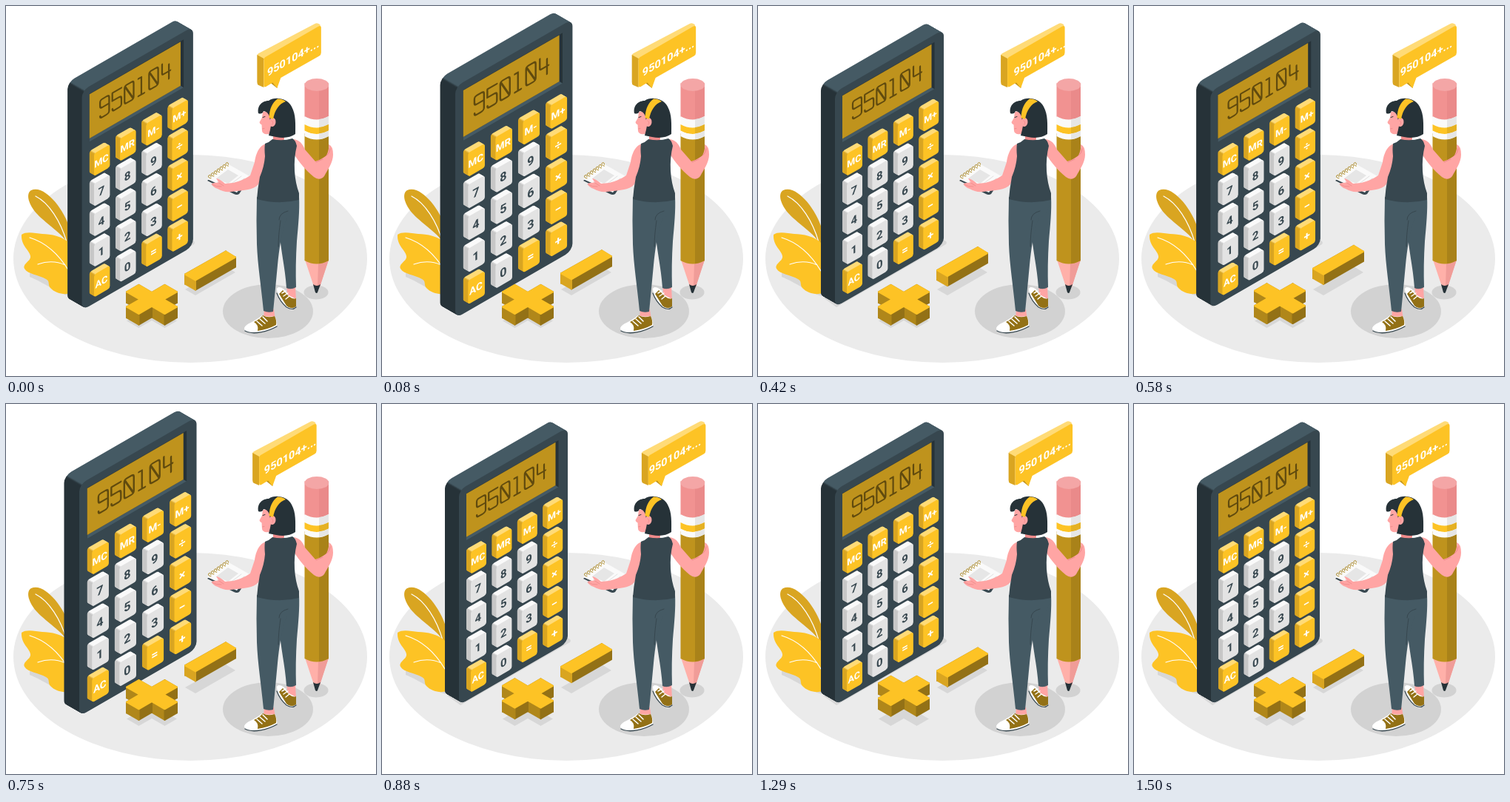
An HTML page with a canvas for the animation above (1540 ms loop, 500 by 500 pixels).

```html
<!DOCTYPE html>
<html lang="en">
<head>
<meta charset="utf-8">
<title>Calculator</title>
<style>
html, body { margin: 0; width: 100%; height: 100%; overflow: hidden; background: #fff; }
canvas { display: block; width: 100vw; height: 100vh; }
</style>
</head>
<body>
<canvas id="stage"></canvas>
<script>
const SIZE = 500, LOOP = 1540, STEPS = 37, CYCLE = 1500, LEAD = 33, ISO = 0.577;
const GOLD = '#fdc325', DARK = '#263238', SLATE = '#37474f', STEEL = '#455a64';
const OCHRE = '#bf931d', OLIVE = '#937116', SKIN = '#ffa5a4', BLUSH = '#ee8a8a', SHADE = '#d7d7d7';

const canvas = document.getElementById('stage');
const ctx = canvas.getContext('2d');
const density = Math.max(1, window.devicePixelRatio || 1);
canvas.width = canvas.height = SIZE * density;

// Motion curves: pairs of [cycle fraction, value], linear in between.
const BEAT = [[0, 1], [.1, 1.1], [.3, 1], [.4, 1], [.5, 1.1], [.6, 1], [1, 1]];
const SHAKE = [[0, 0], [.1, -1], [.2, 2], [.3, -4], [.4, 4], [.5, -4], [.6, 4], [.7, -4], [.8, 2], [.9, -1], [1, 0]];
const FLOAT = [[0, 0], [.5, -10], [1, 0]];

function curve(keys, p) {
  const i = Math.max(1, keys.findIndex(k => k[0] >= p));
  const [a, b] = [keys[i - 1], keys[i]];
  return a[1] + (b[1] - a[1]) * (p - a[0]) / (b[0] - a[0]);
}

function fill(d, color) {
  ctx.fillStyle = color;
  ctx.fill(new Path2D(d));
}

function line(d, color, width) {
  ctx.strokeStyle = color;
  ctx.lineWidth = width;
  ctx.lineCap = ctx.lineJoin = 'round';
  ctx.stroke(new Path2D(d));
}

function oval(x, y, rx, ry, color, turn = 0) {
  ctx.fillStyle = color;
  ctx.beginPath();
  ctx.ellipse(x, y, rx, ry, turn, 0, Math.PI * 2);
  ctx.fill();
}

function at(x, y, draw) {
  ctx.save();
  ctx.translate(x, y);
  draw();
  ctx.restore();
}

// Upright plane running up to the right.
function onPlane(x, y, draw) {
  ctx.save();
  ctx.transform(1, -ISO, 0, 1, x, y);
  draw();
  ctx.restore();
}

function roundBox(x, y, w, h, r) {
  ctx.beginPath();
  ctx.roundRect(x, y, w, h, r);
  ctx.fill();
}

// Rounded plate on the plane with thickness going back to the upper left.
function slab(u, v, w, h, r, depth, side, top, front) {
  for (let d = depth; d > 0; d -= .5) {
    const x = u - d, g = ctx.createLinearGradient(x + r * .3, 0, x + r * .3 + 1.5, 0);
    g.addColorStop(0, side);
    g.addColorStop(1, top);
    ctx.fillStyle = g;
    roundBox(x, v - 2 * ISO * d, w, h, r);
  }
  ctx.fillStyle = front;
  roundBox(u, v, w, h, r);
}

const outline = points => 'M' + points.map(p => p.join(' ')).join('L') + 'Z';

// Lying block: vertical walls below a flat top outline.
function prism(points, height, leftColor, rightColor) {
  const paint = (ps, color) => { fill(outline(ps), color); line(outline(ps), color, 2); };
  points.map((a, i) => [a, points[(i + 1) % points.length]])
    .sort((e, f) => e[0][1] + e[1][1] - f[0][1] - f[1][1])
    .forEach(([a, b]) => {
      const falling = (b[1] - a[1]) * (b[0] - a[0]) > 0;
      paint([a, b, [b[0], b[1] + height], [a[0], a[1] + height]], falling ? leftColor : rightColor);
    });
  paint(points, GOLD);
}

const MINUS = [[242, 363], [297, 332], [310, 340], [256, 371]];
const ARM = 30.3, HALF = 9.7;
const PLUS = [[-ARM, -HALF], [-ARM, HALF], [-HALF, HALF], [-HALF, ARM], [HALF, ARM], [HALF, HALF],
  [ARM, HALF], [ARM, -HALF], [HALF, -HALF], [HALF, -ARM], [-HALF, -ARM], [-HALF, -HALF]]
  .map(([q, p]) => [197 + .85 * (p + q), 396.5 + .49 * (q - p)]);

function ground() {
  oval(249, 341.5, 239, 140.5, '#ebebeb');
  oval(354, 412.5, 61, 36.5, '#d2d2d2');
  oval(419, 387, 16.5, 9.5, '#d2d2d2');
  fill('M32 361C42 355 62 362 86 372V392C70 388 48 372 32 366Z', SHADE);
  fill('M88 394L106 407L254 322Q257 318 250 316Z', SHADE);
  at(0, 20, () => fill(outline(MINUS), SHADE));
  at(0, 19, () => fill(outline(PLUS), SHADE));
}

function leaves() {
  fill('M86 325C76 306 57 297 42 281C31 269 26 254 34 249C52 241 78 274 86 300Z', '#d9a521');
  line('M40 257C58 266 74 291 82 319', '#fff', 1.2);
  fill('M21 309C27 304 40 307 49 308C60 308 78 311 87 322V388C79 391 66 388 60 381C56 377 60 372 54 369C44 363 30 363 25 355C22 348 34 345 33 338C32 330 20 324 21 309Z', GOLD);
  line('M32 313C52 319 71 335 85 358M43 349C57 344 69 345 80 350', '#fff', 1.2);
}

const DIGITS = {
  9: 'M12 11H3Q0 11 0 8V3Q0 0 3 0H9Q12 0 12 3V21Q12 24 8 24H3Q0 24 0 21',
  5: 'M12 0H0V10.500H9Q12 10.500 12 14V21Q12 24 9 24H3Q0 24 0 21',
  0: 'M3 0H9Q12 0 12 3V21Q12 24 9 24H3Q0 24 0 21V3Q0 0 3 0ZM1 2L11 22',
  1: 'M2 1H6V24M2 24H10',
  4: 'M1 0V12Q1 14 3 14H12M10 5V24'
};

const KEYS = [
  ['MC', 'MR', 'M-', 'M+'],
  ['7', '8', '9', '÷'],
  ['4', '5', '6', '×'],
  ['1', '2', '3', '−'],
  ['AC', '0', '=', '+']
];

function screen() {
  ctx.fillStyle = DARK;
  ctx.fillRect(10, 7.5, 124.5, 63.5);
  fill('M10 66.4H130.500L134.500 71H10Z', STEEL);
  ctx.fillStyle = OCHRE;
  ctx.fillRect(10, 8, 120.5, 58.4);
  [...'950104'].forEach((c, i) => at(24 + i * 16.2, 24, () => line(DIGITS[c], '#604a0e', 2.2)));
}

function key(label, row, col) {
  const u = 16 + col * 34.4, v = 90 + row * 40;
  const pale = /\d/.test(label);
  if (pale) slab(u, v, 21, 30, 3, 6, '#c7c7c7', '#fafafa', '#e3e3e3');
  else slab(u, v, 21, 30, 3, 6, '#d9a521', '#ffdb77', GOLD);
  ctx.fillStyle = pale ? SLATE : '#fff';
  ctx.font = `700 ${label.length > 1 ? 12.5 : 15}px Roboto, "Open Sans", sans-serif`;
  ctx.textAlign = 'center';
  ctx.textBaseline = 'middle';
  ctx.fillText(label, u + 9.8, v + 15.8);
}

function calculator(scale) {
  ctx.save();
  ctx.translate(168, 213.5);
  ctx.scale(scale, scale);
  ctx.translate(-168, -213.5);
  onPlane(104, 119, () => {
    slab(0, -2.5, 147, 290.5, 9, 19, DARK, STEEL, SLATE);
    screen();
    KEYS.forEach((row, r) => row.forEach((label, c) => key(label, r, c)));
  });
  ctx.restore();
}

function bubble(shake) {
  at(shake * 3, 0, () => {
    fill('M357 103L367 111L370 95Z', OCHRE);
    fill('M340 67Q340 65 342 64L418 24Q421 22 425 25L426 30L349 73Z', '#ffdb77');
    fill('M340 66L349 71V110L342 107Q340 106 340 103Z', '#d9a521');
    fill('M349 73Q349 70 352 68.500L423 27.500Q426.500 26 426.500 29V63Q426.500 66 424 67.500L372 97L367 111L361 103.500L352 109Q349 110.500 349 107Z', GOLD);
  });
  onPlane(353.4 + shake * 2, 95.4, () => {
    ctx.fillStyle = '#fff';
    ctx.font = '700 14.5px Roboto, "Open Sans", sans-serif';
    ctx.textAlign = 'left';
    ctx.textBaseline = 'alphabetic';
    ctx.fillText('950104+...', 0, 0);
  });
}

function band(top, bottom, color, shadeColor) {
  fill(`M403.5 ${top}Q420 ${top + 9} 436 ${top}V${bottom}Q420 ${bottom + 9} 403.5 ${bottom}Z`, color);
  fill(`M423 ${top + 4}Q430 ${top + 3} 436 ${top}V${bottom}Q430 ${bottom + 3} 423 ${bottom + 4}Z`, shadeColor);
}

function pencil() {
  fill('M404 343L416 379H424L436 343Z', '#ffb0a9');
  fill('M422 347L421 380H424L436 343Z', '#f09c98');
  fill('M415 376Q420 380 425 376L421 387Q420 389 418 387Z', DARK);
  band(172, 344, OCHRE, '#a98219');
  band(104, 150, '#f19291', '#ea8a8a');
  band(149, 160, '#fafafa', '#e6e6e6');
  band(160, 168.5, GOLD, '#e5b123');
  band(168.5, 176, '#fafafa', '#e6e6e6');
  oval(420, 106.5, 16.3, 8.5, '#f4a6a6');
}

function notebook() {
  fill('M272 236L300 215L329 233L315 254Q312 256 308 254Z', SLATE);
  fill('M272 234L299 213L329 230L312 252Z', '#fafafa');
  fill('M284 233L300 221L314 229L300 240Z', '#e6e6e6');
  line('M302 242L318 230M307 245L322 233', '#e0e0e0', 1);
  for (let i = 0; i < 7; i++) {
    const x = 275 + i * 3.9, y = 231 - i * 2.8;
    line(`M${x + 2} ${y + 2}Q${x - 3} ${y + 1} ${x - 1} ${y - 2}Q${x + 2} ${y - 4} ${x + 2} ${y}`, '#a88319', .9);
  }
}

function shoes() {
  fill('M349 410H362L364 424L348 423Z', SKIN);
  fill('M379 378H391L392 398L381 396Z', SKIN);
  fill('M366 384C365 379 371 379 376 383L382 391L392 396V408Q386 413 379 408L369 396Z', '#fff');
  fill('M369 389L374 384L382 392Q388 397 392 395V406Q385 411 379 405Z', OLIVE);
  line('M366 388Q370 399 379 407Q387 412 392 407', SLATE, 1.2);
  line('M373 388L378 385M375 392L381 388M378 396L383 392', '#fff', 1.5);
  fill('M322 435C324 429 336 427 346 418Q354 421 363 419Q367 426 366 433C354 440 337 444 327 441Q322 440 322 435Z', '#fff');
  fill('M335 427Q342 424 347 418Q354 422 363 419Q366 425 365 431Q354 437 340 439Q342 431 335 427Z', OLIVE);
  line('M323 439C334 445 354 440 366 433', SLATE, 1.4);
  line('M339 426L346 432M343 423L350 429M347 420L353 426', '#fff', 1.6);
}

function woman() {
  shoes();
  fill('M367 258H396C397 276 395 296 393 318Q391 350 392 380Q385 384 379 381C377 352 371 330 369 300Z', STEEL);
  fill('M339 258H396C394 272 390 283 379 288C372 306 369 330 367 350Q364 382 361 413Q354 415 348 412C345 380 340 350 339 322Q338 290 339 258Z', STEEL);
  line('M369 289Q369 280 381 277M371 290Q368 310 368 325', SLATE, 1);
  // Arm round the pencil
  fill('M384 180C397 179 401 187 404 194L418 210Q427 207 433 202Q437 194 436 187Q442 189 442 201C442 211 435 221 430 230Q424 237 416 231C405 222 396 211 389 200Z', SKIN);
  line('M433 202Q437 200 438 193M419 211L428 207', BLUSH, 1);
  // Arm with the notebook
  fill('M356 185C343 186 338 198 336 211L330 229Q320 236 307 239L296 240Q288 233 284 233L288 239Q279 238 278 241Q280 245 286 247Q294 252 304 251C320 249 334 249 341 241Q347 227 352 208Z', SKIN);
  line('M286 238L294 243M278 241Q285 245 291 244', BLUSH, .8);
  fill('M361 168H376V180Q372 188 361 182Z', BLUSH);
  fill('M350 186Q356 184 360 180Q374 183 387 179Q391 181 393 189Q389 205 390 223Q391 239 396 253L396 262Q368 269 339 261Q340 247 343 231Q349 217 350 203Q349 193 350 186Z', SLATE);
  // Head
  fill('M347 143L346 151L342.500 157Q343 160 345.500 160.500L346 169Q347 174 355 173L366 173V141Z', SKIN);
  line('M346.500 166L349 165.500', BLUSH, .9);
  line('M347 150.500L350 149.500', DARK, 1);
  fill('M341 145C339 134 347 128 355 128C363 122 380 124 386 136C392 147 391 160 391 173Q381 180 365 177L355 175Q357 168 358 162L356 149Q353 142 348 142Q346 147 341 145Z', DARK);
  oval(360, 157, 4.5, 6, SKIN, .15);
  line('M359 155Q362 156 360 160', BLUSH, .8);
  fill('M367 125.500Q373 125 378 129C369 132 363 141 361 153L355.500 151C356 139 360 130 367 125.500Z', GOLD);
}

function render(time) {
  const step = Math.min(STEPS - 1, Math.floor((time + 5) * STEPS / LOOP));
  const phase = Math.min(CYCLE, step * LOOP / STEPS + LEAD);
  const p = phase / CYCLE;
  const late = Math.max(0, phase - 500) / CYCLE;

  ctx.setTransform(density, 0, 0, density, 0, 0);
  ctx.fillStyle = '#fff';
  ctx.fillRect(0, 0, SIZE, SIZE);
  ground();
  leaves();
  calculator(curve(BEAT, p));
  at(0, curve(FLOAT, p), () => prism(MINUS, 13, '#d9a521', OLIVE));
  at(0, curve(FLOAT, late), () => prism(PLUS, 14.5, '#b0871a', OLIVE));
  pencil();
  notebook();
  woman();
  bubble(curve(SHAKE, p));
}

const start = performance.now();
function tick() {
  render((performance.now() - start) % LOOP);
  requestAnimationFrame(tick);
}
tick();
</script>
</body>
</html>
```
